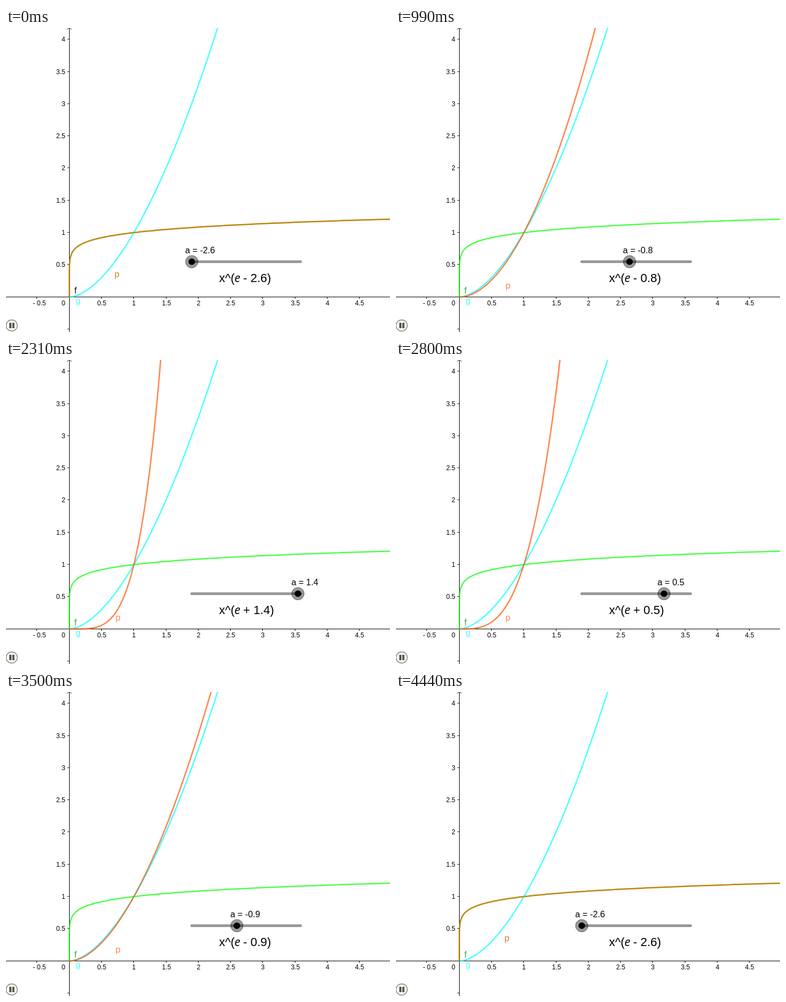
An HTML page with a canvas that plays this animation: 706x560 px, repeating every 4490 ms.

```html
<!DOCTYPE html>
<html lang="en">
<head>
<meta charset="utf-8">
<title>Power function slider</title>
<style>
html, body { margin: 0; width: 100%; height: 100%; overflow: hidden; background: #fff; }
canvas { display: block; }
</style>
</head>
<body>
<canvas id="stage" width="706" height="560"></canvas>
<script>
const ctx = document.getElementById('stage').getContext('2d');
const W = 706, H = 560, LOOP = 4490;
const OX = 116.5, OY = 495.5, UNIT = 118.6;
const TRACK_X = 341.5, TRACK_Y = 430.5, TRACK_UNIT = 48.8;
const SANS = '"Liberation Sans", Arial, sans-serif';
const TOP = 40;

// [step, start in ms]; steps between these are evenly spaced
const KEYS = [
  [0, 0], [1, 50], [10, 540], [11, 600], [18, 990], [19, 1030], [20, 1090],
  [21, 1140], [29, 1600], [30, 1630], [31, 1690], [40, 2180], [42, 2310],
  [43, 2370], [51, 2800], [52, 2860], [61, 3350], [62, 3400], [64, 3500],
  [65, 3560], [71, 3890], [72, 3950], [81, 4440], [82, LOOP]
];

const starts = [];
for (let i = 0; i + 1 < KEYS.length; i++) {
  const [s0, t0] = KEYS[i], [s1, t1] = KEYS[i + 1];
  for (let s = s0; s < s1; s++) {
    starts[s] = Math.round((t0 + (t1 - t0) * (s - s0) / (s1 - s0)) / 10) * 10;
  }
}

function stepAt(ms) {
  let s = starts.length - 1;
  while (s > 0 && starts[s] > ms) s--;
  return s;
}

// 40 even moves over a range of 4.1, snapped to tenths
function valueAt(step) {
  const k = step <= TOP ? step : 2 * TOP + 1 - step;
  return (Math.round(k * 1.025 + 1e-9) - 26) / 10;
}

function text(str, x, y, size, color = '#000', align = 'left', font = SANS, style = '') {
  ctx.font = `${style} ${size}px ${font}`;
  ctx.textAlign = align;
  ctx.fillStyle = color;
  ctx.fillText(str, x, y);
}

function line(x0, y0, x1, y1) {
  ctx.beginPath();
  ctx.moveTo(x0, y0);
  ctx.lineTo(x1, y1);
  ctx.stroke();
}

function disc(x, y, r, fill) {
  ctx.beginPath();
  ctx.arc(x, y, r, 0, 2 * Math.PI);
  ctx.fillStyle = fill;
  ctx.fill();
}

const snap = v => Math.floor(v) + 0.5;

function drawAxes() {
  ctx.strokeStyle = '#000';
  ctx.lineWidth = 1;
  ctx.lineCap = 'butt';
  line(0, OY, W, OY);
  line(OX, 0, OX, H);
  line(OX, -1, OX - 4, 3);
  line(OX, -1, OX + 4, 3);
  for (let i = -1; i <= 9; i++) {
    if (!i) continue;
    const x = snap(OX + i * UNIT / 2 - 0.4);
    const label = i < 0 ? '- 0.5' : String(i / 2);
    line(x, OY, x, OY + 3.5);
    text(label, i < 0 ? x + 5 : x + 0.5, 511, 12, '#000', 'center');
  }
  for (let i = -1; i <= 8; i++) {
    if (!i) continue;
    const y = snap(OY - i * UNIT / 2 - 0.4);
    line(OX - 3.5, y, OX, y);
    if (i > 0) text(String(i / 2), 109, y + 4, 12, '#000', 'right');
  }
  text('0', 109, 511, 12, '#000', 'right');
}

function drawPower(exp, color) {
  const n = 500;
  ctx.beginPath();
  ctx.moveTo(OX, OY);
  for (let i = 1; i <= n; i++) {
    const x = 5.05 * Math.pow(i / n, 8);
    const y = Math.pow(x, exp);
    ctx.lineTo(OX + x * UNIT, OY - y * UNIT);
    if (y > 4.4) break;
  }
  ctx.strokeStyle = color;
  ctx.lineWidth = 2.5;
  ctx.lineJoin = 'round';
  ctx.lineCap = 'butt';
  ctx.stroke();
}

function drawSlider(a) {
  const x = TRACK_X + (a + 2.6) * TRACK_UNIT;
  ctx.strokeStyle = '#999';
  ctx.lineWidth = 5;
  ctx.lineCap = 'round';
  line(TRACK_X, TRACK_Y, TRACK_X + 4.1 * TRACK_UNIT, TRACK_Y);
  disc(x, TRACK_Y, 11.5, 'rgba(0,0,0,0.4)');
  ctx.strokeStyle = 'rgba(0,0,0,0.4)';
  ctx.lineWidth = 1;
  ctx.stroke();
  disc(x, TRACK_Y, 6, '#000');
  text('a = ' + a, x - 12, 415, 16);
}

function drawFormula(a) {
  text('x^(', 391.8, 467.5, 22);
  text('e', 420, 467.5, 22, '#000', 'left', '"Open Sans", sans-serif', 'italic');
  text(`${a < 0 ? '-' : '+'} ${Math.abs(a)})`, 436, 467.5, 22);
}

function drawPause() {
  disc(10.5, 548, 10.3, '#fff');
  ctx.strokeStyle = '#858585';
  ctx.lineWidth = 1.4;
  ctx.stroke();
  ctx.fillStyle = '#5c5448';
  ctx.fillRect(6, 543, 4, 10);
  ctx.fillRect(11.5, 543, 4, 10);
}

function draw(step) {
  const a = valueAt(step);
  const exp = Math.E + a;
  const low = a === -2.6;
  ctx.fillStyle = '#fff';
  ctx.fillRect(0, 0, W, H);
  drawAxes();
  drawPower(Math.E - 2.6, 'rgba(0,255,0,0.7)');
  drawPower(Math.E - 1, 'rgba(0,255,255,0.7)');
  drawPower(exp, 'rgba(255,80,0,0.7)');

  text('f', 125.5, 488.5, 16, step ? '#33a840' : '#111');
  text('g', 128, 508, 16, '#4dffff');
  const lift = UNIT * Math.pow(4.3e-7, exp);
  const color = !low ? '#ff854d' : step ? '#e07030' : '#ca8417';
  text('p', low ? 199.5 : 201.5, 480.3 - lift, 16, color);

  drawSlider(a);
  drawFormula(a);
  drawPause();
}

const begin = performance.now();
function tick() {
  draw(stepAt((performance.now() - begin) % LOOP));
  requestAnimationFrame(tick);
}
tick();
</script>
</body>
</html>
```
